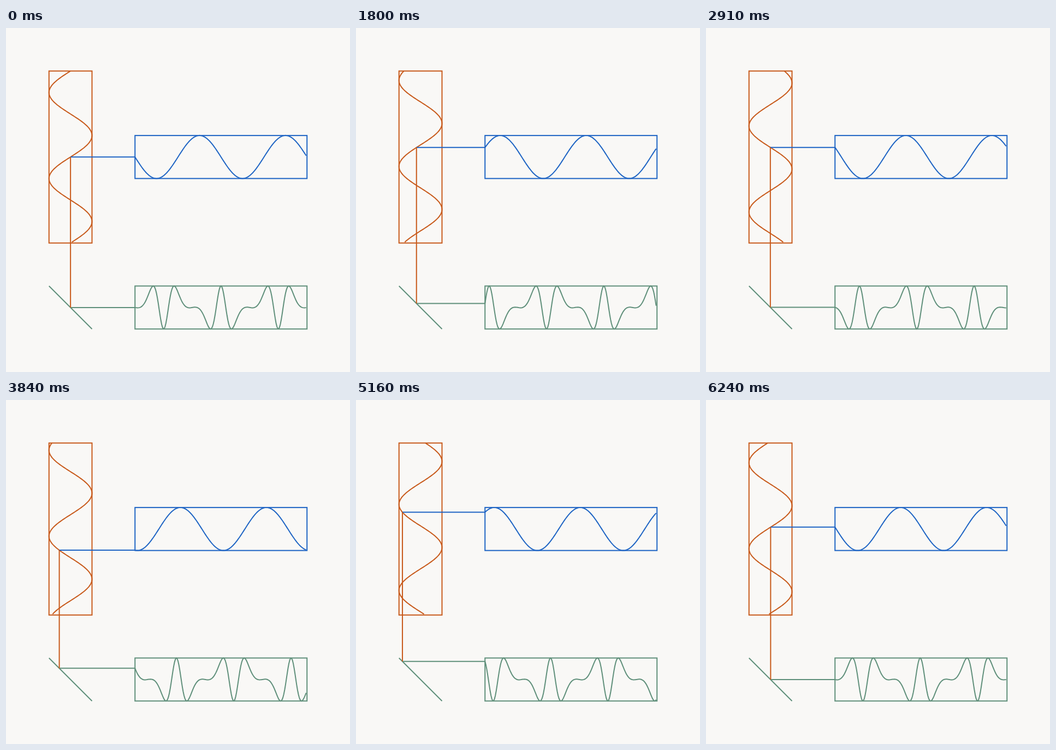
These frames come from a looping animation (630 px wide and 630 px high, 6.27 s). An HTML page with a canvas:

```html
<!DOCTYPE html>
<html lang="en">
<head>
<meta charset="utf-8">
<title>Composed waves</title>
<style>
  html, body { margin: 0; width: 100%; height: 100%; overflow: hidden; background: #f9f8f6; }
  canvas { display: block; width: 630px; height: 630px; }
</style>
</head>
<body>
<canvas id="stage" width="630" height="630"></canvas>
<script>
const ctx = document.getElementById('stage').getContext('2d');
const BG = '#f9f8f6', ORANGE = '#c85a1b', BLUE = '#1e64c4', GREEN = '#5f8f7a';
const LOOP = 6270, STEP = 30;

const U = 630 / 16;          // grid unit and wave amplitude
const LONG = 8 * U;          // length of each box
const SAMPLES = 200;
const K = 4 * Math.PI / LONG; // two wavelengths per box

const tall = { x: 2 * U, y: 2 * U };
const top_ = { x: 6 * U, y: 5 * U };
const low = { x: 6 * U, y: 12 * U };

// Inner wave: height at distance d from the left edge of the blue box
const inner = (d, t) => top_.y + U + U * Math.sin(2 * t - K * -d);
// Outer wave: horizontal position at height y in the orange box
const outer = (y, t) => tall.x + U - U * Math.sin(K * (y - tall.y) - 3 * t);
// The diagonal mirror turns x into y
const mirror = x => low.y + (x - tall.x);
const composed = t => mirror(outer(inner(0, t), t));

function path(color, points) {
  ctx.strokeStyle = color;
  ctx.beginPath();
  points.forEach(([x, y]) => ctx.lineTo(x, y));
  ctx.stroke();
}

function box(color, b, w, h) {
  ctx.strokeStyle = color;
  ctx.strokeRect(b.x, b.y, w, h);
}

function curve(color, at) {
  path(color, Array.from({ length: SAMPLES }, (_, i) => at(i * LONG / SAMPLES)));
}

function draw(t) {
  ctx.fillStyle = BG;
  ctx.fillRect(0, 0, 630, 630);
  ctx.lineWidth = 2;
  ctx.lineJoin = 'miter';

  box(ORANGE, tall, 2 * U, LONG);
  box(BLUE, top_, LONG, 2 * U);
  box(GREEN, low, LONG, 2 * U);
  path(GREEN, [[tall.x, low.y], [tall.x + 2 * U, low.y + 2 * U]]);

  curve(ORANGE, d => [outer(tall.y + d, t), tall.y + d]);
  curve(BLUE, d => [top_.x + d, inner(d, t)]);
  // The result drifts right, so distance means delay
  curve(GREEN, d => [low.x + d, composed(t - 3 * Math.PI * d / LONG)]);

  const y = inner(0, t), x = outer(y, t), out = mirror(x);
  path(GREEN, [[x, out], [low.x, out]]);
  path(BLUE, [[x, y], [top_.x, y]]);
  path(ORANGE, [[x, y], [x, out]]);
}

function tick() {
  const ms = (performance.now() + 0.5) % LOOP;
  draw(Math.floor(ms / STEP) * STEP / 1000);
  requestAnimationFrame(tick);
}
tick();
</script>
</body>
</html>
```
